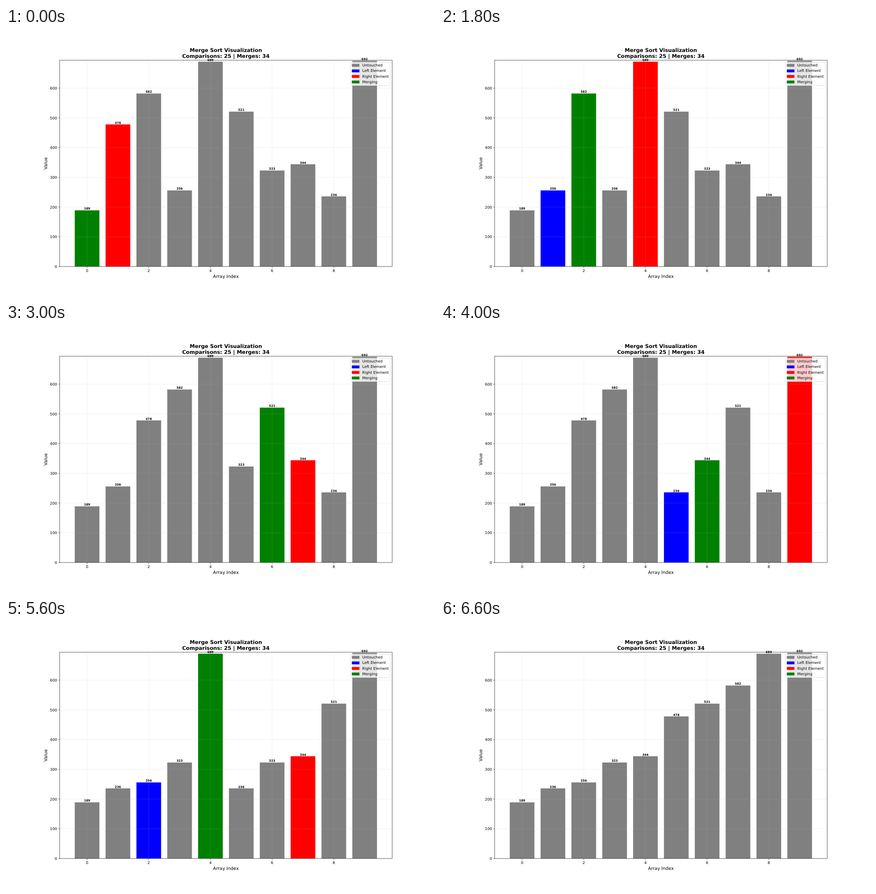
Animation, 947 px wide and 592 px high, one loop 6.8 s. Source, as an HTML page with a canvas:

```html
<!DOCTYPE html>
<html lang="en">
<head>
<meta charset="utf-8">
<title>Merge Sort Visualization</title>
<style>
  html, body { margin: 0; width: 100%; height: 100%; overflow: hidden; background: #fff; }
  canvas { display: block; }
</style>
</head>
<body>
<canvas id="chart" width="947" height="592"></canvas>
<script>
const ctx = document.getElementById('chart').getContext('2d');
const STEP_MS = 200;
const PT = 947 / 16 / 72; // one typographic point on a 16 inch wide figure
const LEFT = 118.4, RIGHT = 852.3, TOP = 71.1, BOTTOM = 526.9;
const MID_X = (LEFT + RIGHT) / 2, MID_Y = (TOP + BOTTOM) / 2;
const LEGEND = [['gray', 'Untouched'], ['blue', 'Left Element'], ['red', 'Right Element'], ['green', 'Merging']];

const xOf = index => LEFT + (index + 0.89) * (RIGHT - LEFT) / 10.78;
const yOf = value => BOTTOM - value * (BOTTOM - TOP) / 694.05;

// Records one step before every comparison and one after each finished merge.
function recordSort(values) {
  const steps = [];
  let comparisons = 0, merges = 0;
  const record = (marks = {}) => steps.push({ values: [...values], marks });

  function sort(lo, hi) {
    if (lo >= hi) return;
    const mid = (lo + hi) >> 1;
    sort(lo, mid);
    sort(mid + 1, hi);
    const before = [...values];
    let i = lo, j = mid + 1;
    for (let k = lo; k <= hi; k++, merges++) {
      let takeLeft = j > hi;
      if (i <= mid && j <= hi) {
        comparisons++;
        record({ [i]: 'blue', [j]: 'red', [k]: 'green' });
        takeLeft = before[i] <= before[j];
      }
      values[k] = before[takeLeft ? i++ : j++];
    }
    record();
  }

  sort(0, values.length - 1);
  return { steps, comparisons, merges };
}

function text(string, x, y, points, align = 'center', weight = 'normal') {
  ctx.font = `${weight} ${points * PT}px "DejaVu Sans", sans-serif`;
  ctx.textAlign = align;
  ctx.fillStyle = '#000';
  ctx.fillText(string, x, y);
}

function line(x1, y1, x2, y2, color) {
  ctx.strokeStyle = color;
  ctx.lineWidth = 0.8 * PT;
  ctx.beginPath();
  ctx.moveTo(x1, y1);
  ctx.lineTo(x2, y2);
  ctx.stroke();
}

function drawBars({ values, marks }) {
  values.forEach((value, i) => {
    ctx.fillStyle = marks[i] || 'gray';
    ctx.fillRect(xOf(i - 0.4), yOf(value), xOf(0.8) - xOf(0), BOTTOM - yOf(value));
  });
}

function drawAxes() {
  const grid = 'rgba(176, 176, 176, 0.3)', tick = 3.5 * PT;
  for (let i = 0; i < 10; i += 2) {
    line(xOf(i), TOP, xOf(i), BOTTOM, grid);
    line(xOf(i), BOTTOM, xOf(i), BOTTOM + tick, '#000');
    text(i, xOf(i), 539.4, 10);
  }
  for (let v = 0; v <= 600; v += 100) {
    line(LEFT, yOf(v), RIGHT, yOf(v), grid);
    line(LEFT - tick, yOf(v), LEFT, yOf(v), '#000');
    text(v, LEFT - 2 * tick, yOf(v) + 3.1, 10, 'right');
  }
  ctx.strokeStyle = '#000';
  ctx.strokeRect(LEFT, TOP, RIGHT - LEFT, BOTTOM - TOP);

  text('Array Index', MID_X, 552.4, 12);
  ctx.save();
  ctx.translate(90.6, MID_Y);
  ctx.rotate(-Math.PI / 2);
  text('Value', 0, 0, 12);
  ctx.restore();
}

function drawLegend() {
  ctx.beginPath();
  ctx.roundRect(760.3, 75.2, 87.9, 52, 1.6);
  ctx.fillStyle = 'rgba(255, 255, 255, 0.8)';
  ctx.fill();
  ctx.strokeStyle = 'rgba(204, 204, 204, 0.8)';
  ctx.lineWidth = PT;
  ctx.stroke();
  LEGEND.forEach(([color, label], row) => {
    const y = 85.2 + row * 12.25;
    ctx.fillStyle = color;
    ctx.fillRect(763.4, y - 5.8, 16.8, 6.2);
    text(label, 786.6, y, 10, 'left');
  });
}

const sorted = recordSort([189, 478, 582, 256, 689, 521, 323, 344, 236, 692]);

function draw(step) {
  ctx.clearRect(0, 0, 947, 592);
  drawBars(step);
  drawAxes();
  step.values.forEach((value, i) => text(value, xOf(i), yOf(value) - 1.3, 8, 'center', 'bold'));
  text('Merge Sort Visualization', MID_X, 53, 14, 'center', 'bold');
  text(`Comparisons: ${sorted.comparisons} | Merges: ${sorted.merges}`, MID_X, 66.1, 14, 'center', 'bold');
  drawLegend();
}

ctx.textRendering = 'geometricPrecision';
const start = performance.now();
function tick() {
  const elapsed = Math.max(0, performance.now() - start);
  draw(sorted.steps[Math.floor(elapsed / STEP_MS) % sorted.steps.length]);
  requestAnimationFrame(tick);
}
tick();
</script>
</body>
</html>
```
